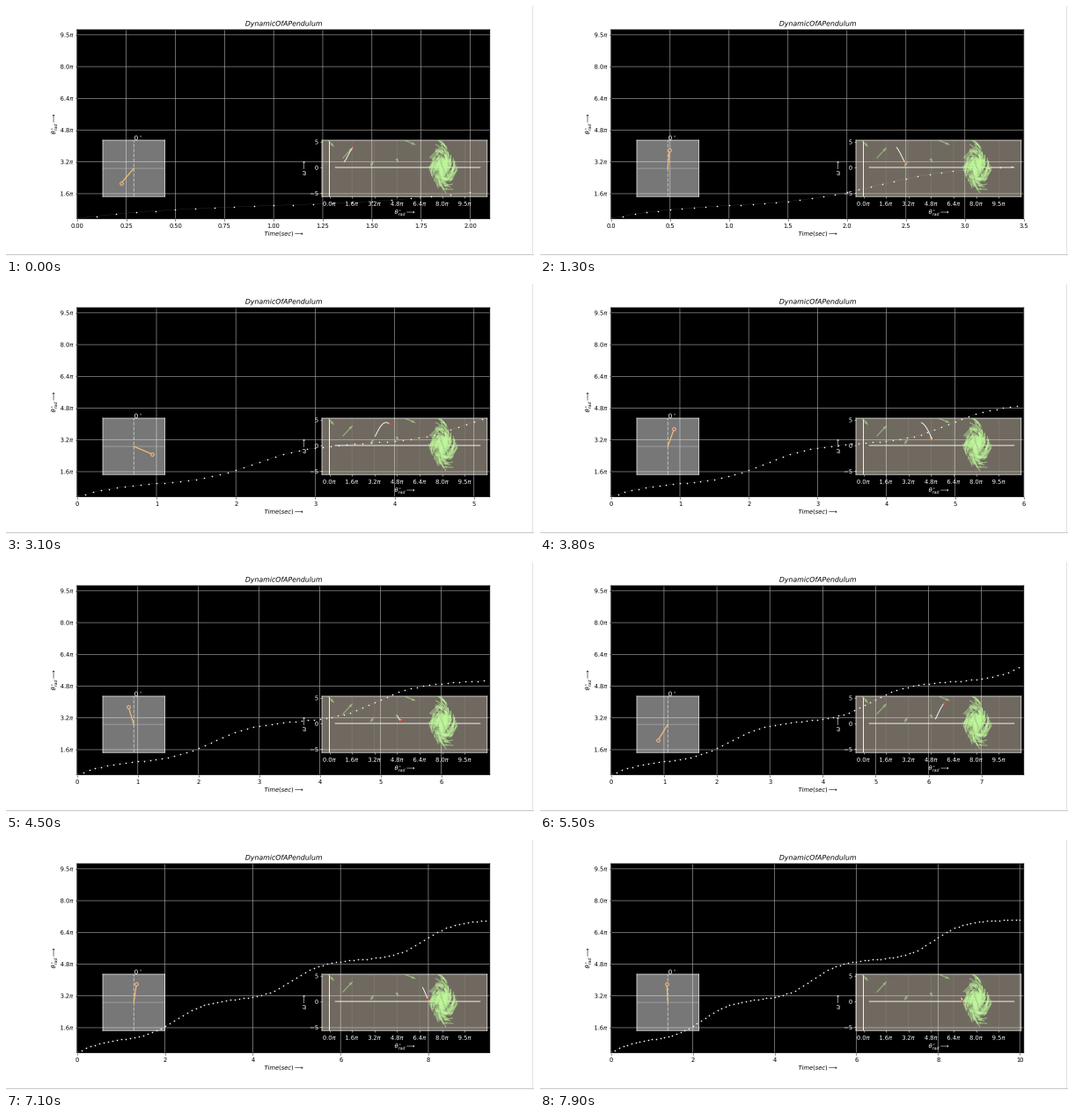
Write a matplotlib script that moves like this. It is 600x285 px and loops after 8000 ms.

```python
import math

import matplotlib.pyplot as plt
import numpy as np
from matplotlib.animation import FuncAnimation
from matplotlib.patches import PathPatch
from matplotlib.textpath import TextPath
from matplotlib.transforms import Affine2D

W, H, DPI = 600, 285, 100
PT = 72 / DPI  # points per pixel
FRAMES, INTERVAL = 80, 100
DT, SUBSTEPS = 0.1, 4
TRAIL = 10
GRAVITY, DAMPING = 4.905, 0.01

plt.rcParams.update({
    "font.family": "DejaVu Sans",
    "mathtext.fontset": "dejavusans",
    "font.size": 6.6 * PT,
    "text.hinting": "no_hinting",
    "path.snap": False,
})


def slope(theta, omega):
    return omega, -GRAVITY * np.sin(theta) - DAMPING * omega


def simulate(theta, omega, steps):
    """Runge-Kutta states of the damped pendulum, one every DT seconds."""
    h = DT / SUBSTEPS
    state = np.array([theta, omega])
    states = [state]
    for _ in range(steps):
        for _ in range(SUBSTEPS):
            k1 = np.array(slope(*state))
            k2 = np.array(slope(*(state + h / 2 * k1)))
            k3 = np.array(slope(*(state + h / 2 * k2)))
            k4 = np.array(slope(*(state + h * k3)))
            state = state + h / 6 * (k1 + 2 * k2 + 2 * k3 + k4)
        states.append(state)
    return np.array(states).T


theta, omega = simulate(1.1, 3.941, 6000)
times = np.arange(theta.size) * DT

fig = plt.figure(figsize=(W / DPI, H / DPI), dpi=DPI, facecolor="white")


def pixel_axes(left, top, right, bottom, face, edge):
    """Axes placed by pixel edges measured from the top left."""
    ax = fig.add_axes([left / W, 1 - bottom / H, (right - left) / W, (bottom - top) / H])
    ax.set_facecolor(face)
    for spine in ax.spines.values():
        spine.set(color=edge, linewidth=0.7 * PT)
    ax.tick_params(length=2.3 * PT, width=0.55 * PT, pad=2.7 * PT, color=edge)
    return ax


def label(x, y, text, color="black", size=6.7, angle=0):
    """Text outline centred on a pixel, free of glyph rounding."""
    path = TextPath((0, 0), text, size=size)
    box = path.get_extents()
    place = (Affine2D()
             .translate(-(box.x0 + box.x1) / 2, -(box.y0 + box.y1) / 2)
             .rotate_deg(angle)
             .translate(x, H - y)
             .scale(1 / W, 1 / H))
    fig.add_artist(PathPatch(path, facecolor=color, linewidth=0, zorder=3,
                             transform=place + fig.transFigure))


def edge_line(xs, ys, color):
    fig.add_artist(plt.Line2D(np.array(xs) / W, 1 - np.array(ys) / H,
                              color=color, linewidth=PT))


def pi_label(value):
    return rf"${value / math.pi:.1f}\pi$"


# Main plot: angle against time
angle_ticks = np.arange(5, 31, 5)
main = pixel_axes(80.8, 27, 549.8, 242.5, "black", "black")
main.set_ylim(1.06, 30.81)
main.set_yticks(angle_ticks, [])
main.grid(color="#b0b0b0", linewidth=0.6 * PT)
main.set_axisbelow(True)
for tick in angle_ticks:
    label(69.2, 214 - 7.243 * (tick - 5), pi_label(tick))
curve, = main.plot([], [], ":", color="#909090", linewidth=0.35 * PT)
dots, = main.plot([], [], "o", color="white", markersize=1.6 * PT, markeredgewidth=0)

label(315.5, 20.5, "$DynamicOfAPendulum$", size=7.8)
label(315.5, 259.7, r"$Time(sec)\longrightarrow$")
label(54.5, 135, r"$\theta^{\circ}_{rad}\longrightarrow$", angle=90)

# Pendulum inset
swing = pixel_axes(110, 153, 180.5, 217.2, (1, 1, 1, 0.47), "white")
swing.set(xlim=(-1.53, 1.53), ylim=(-1.53, 1.53), xticks=[], yticks=[])
swing.axhline(0, color="#b8b8c0", linewidth=0.6 * PT)
swing.axvline(0, color="#d4d4d4", linewidth=0.8 * PT, linestyle=(0, (5, 2)))
rod, = swing.plot([], [], color="#f8c070", linewidth=1.2 * PT)
bob, = swing.plot([], [], "o", markersize=3.7 * PT, markerfacecolor="#8c7a70",
                  markeredgecolor="#ffbc90", markeredgewidth=0.9 * PT)
label(150, 150.3, r"$0\,^{\circ}$", "white", 7.2)

# Phase-space inset
phase_ticks = np.arange(0, 31, 5)
phase = pixel_axes(359, 153, 546.8, 217.2, (0.98, 0.92, 0.84, 0.45), "white")
phase.set(xlim=(-1.66, 34.97), ylim=(-5.67, 5.31))
phase.set_xticks(phase_ticks, [])
phase.set_yticks([-5, 0, 5], [])
phase.grid(axis="x", color="#b0b0b0", alpha=0.3, linewidth=0.55 * PT)
phase.set_axisbelow(True)
phase.plot([0, 0], [-5.67, 5], color="white", linewidth=0.9 * PT)
phase.plot([1.3, 33.4], [0, 0], color="white", linewidth=0.9 * PT)
trail, = phase.plot([], [], color="white", linewidth=0.9 * PT, zorder=2.2)
head, = phase.plot([], [], "o", color="#f03c28", markersize=2.4 * PT,
                   markeredgewidth=0, zorder=2.3)
field = theta[::20], omega[::20]
phase.quiver(*field, *slope(*field), pivot="tip", units="dots", width=1.1,
             scale_units="dots", scale=0.34, color="#bef89a", alpha=0.55, zorder=3)
for tick in phase_ticks:
    label(367.5 + 5.127 * tick, 225.3, pi_label(tick), "white")
for x, y, text in [(353, 155, "5"), (353, 184.3, "0"), (350.2, 213.7, "\u22125")]:
    label(x, y, text, "white")
label(453, 235.5, r"$\theta^{\circ}_{rad}\longrightarrow$", "white")
label(339, 185, r"$\omega\longrightarrow$", "white", angle=90)

# Faint page border
edge_line([0, 600], [283.5, 283.5], "#c8c8c8")
edge_line([598.5, 598.5], [0, 282], "#e2e2e2")

# Playback is slightly uneven: steps reached at a few key moments
KEY_FRAMES = [0, 13, 31, 45, 55, 65, 73, 74, 79]
KEY_STEPS = [21, 35, 52, 68, 78, 87, 96, 96, 101]


def update(frame):
    step = int(round(np.interp(frame, KEY_FRAMES, KEY_STEPS)))
    main.set_xlim(0, step * DT + 1e-6)
    for line in (curve, dots):
        line.set_data(times[:step], theta[:step])
    x, y = math.sin(theta[step]), -math.cos(theta[step])
    rod.set_data([0, x], [0, y])
    bob.set_data([x], [y])
    recent = slice(step - TRAIL, step)
    trail.set_data(theta[recent], omega[recent])
    head.set_data(theta[step - 1:step], omega[step - 1:step])
    return curve, dots, rod, bob, trail, head


animation = FuncAnimation(fig, update, frames=FRAMES, interval=INTERVAL,
                          repeat=True, blit=False)
plt.show()
```
